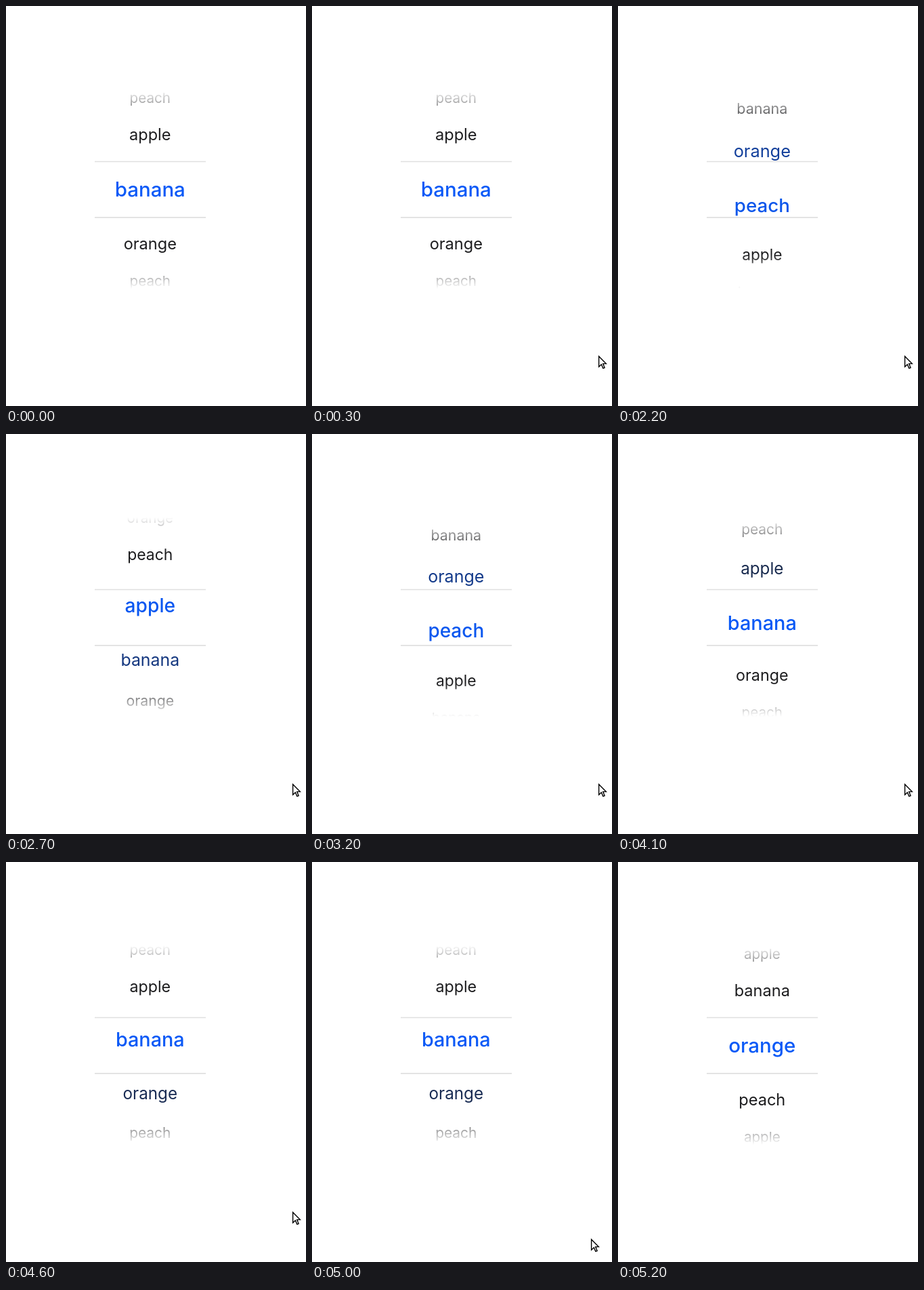
Recreate the animation shown at these times as an HTML page. Size 443x590 px, loop 5.5 s.

```html
<!DOCTYPE html>
<html lang="en">
<head>
<meta charset="utf-8">
<title>Fruit picker</title>
<style>
  html, body { margin: 0; width: 100%; height: 100%; overflow: hidden; background: #fff; }
  svg { display: block; width: 443px; height: 590px; }
  text { font-family: Inter, "Noto Sans", sans-serif; font-optical-sizing: none; text-anchor: middle; }
</style>
</head>
<body>
<svg viewBox="0 0 443 590">
  <defs>
    <linearGradient id="fade" gradientUnits="userSpaceOnUse" x1="0" y1="123" x2="0" y2="417">
      <stop offset="0" stop-color="#000"/>
      <stop offset=".175" stop-color="#fff"/>
      <stop offset=".825" stop-color="#fff"/>
      <stop offset="1" stop-color="#000"/>
    </linearGradient>
    <mask id="window" maskUnits="userSpaceOnUse" x="100" y="123" width="230" height="294"
          style="mask-type: luminance" color-interpolation="sRGB">
      <rect x="100" y="123" width="230" height="294" fill="url(#fade)"/>
    </mask>
  </defs>
  <path d="M131 229.5H295M131 311.8H295" stroke="#e0e0e0" stroke-width="1.7"/>
  <g id="wheel" mask="url(#window)"></g>
  <path id="cursor" d="M.6 .8V16.2L4.3 12.7L6.8 18.4L9.1 17.5L6.7 11.6H11.3Z"
        fill="#fff" stroke="#000" stroke-width="1.4"/>
</svg>
<script>
const LOOP = 5500;
const FRUITS = ["apple", "banana", "orange", "peach"];
const CENTER = { x: 212.8, y: 270.3 };
const BLUE = [10, 89, 247], DARK = [28, 28, 30];

// [start ms, wheel position]
const WHEEL = [
  [0, 1], [2200, 2.7], [2700, 4.22], [3200, 2.75],
  [3600, 4.22], [4100, 4.9], [4600, 5.11], [5100, 6]
];
// [start ms, x, y]; no place means hidden
const POINTER = [
  [0], [100, 387, 551], [200, 406, 531], [300, 423, 516],
  [4900, 419, 535], [5000, 412, 556], [5100, 405, 577], [5200]
];

const wheel = document.getElementById("wheel");
const cursor = document.getElementById("cursor");
const labels = Array.from({ length: 7 }, () =>
  wheel.appendChild(document.createElementNS("http://www.w3.org/2000/svg", "text")));

const mix = (a, b, t) => a + (b - a) * t;
const current = (steps, t) => steps.filter(s => s[0] <= t).pop();

function drawLabel(label, index, position) {
  const offset = index - position;
  const far = Math.abs(offset);
  const near = Math.min(far, 1), rest = Math.min(Math.max(far - 1, 0), 1);
  const size = 29.46 * (1 - 0.2 * near - 0.1 * rest);
  const shift = 80.3 * near + 54.7 * Math.max(far - 1, 0);
  const tint = near ** 2.4;

  label.textContent = FRUITS[(index + 8) % 4];
  label.setAttribute("x", CENTER.x);
  label.setAttribute("y", CENTER.y + Math.sign(offset) * shift + 0.36 * size);
  label.setAttribute("font-size", size);
  label.setAttribute("font-weight", near < 0.5 ? 500 : 400);
  label.setAttribute("fill", `rgb(${BLUE.map((c, i) => Math.round(mix(c, DARK[i], tint)))})`);
}

function render(now) {
  const t = now % LOOP;
  const position = current(WHEEL, t)[1];
  const first = Math.round(position) - 3;
  labels.forEach((label, i) => drawLabel(label, first + i, position));

  const [, x, y] = current(POINTER, t);
  cursor.style.display = x === undefined ? "none" : "";
  if (x !== undefined) cursor.setAttribute("transform", `translate(${x} ${y})`);
}

const start = performance.now();
function tick() {
  render(performance.now() - start);
  requestAnimationFrame(tick);
}
tick();
</script>
</body>
</html>
```
